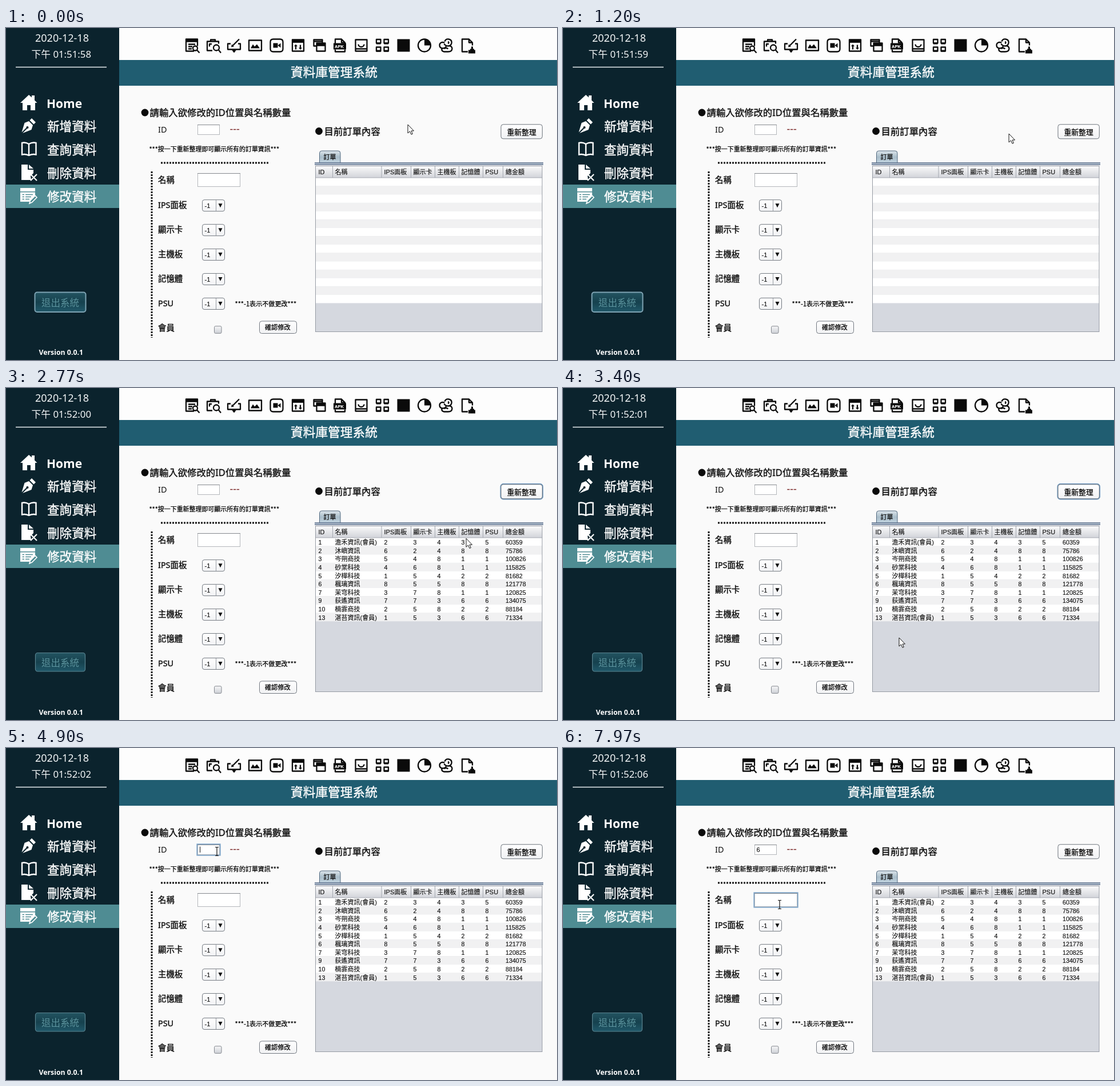
An HTML page for the animation above (8000 ms loop, 964 px wide and 581 px high).

```html
<!DOCTYPE html>
<html lang="zh-Hant">
<head>
<meta charset="utf-8">
<title>資料庫管理系統</title>
<style>
  html, body { margin: 0; width: 100%; height: 100%; overflow: hidden; background: #fafafa; }
  svg { display: block; width: 964px; height: 581px; }
  text { white-space: pre; font-family: "Noto Sans", "Noto Sans CJK TC", "Noto Sans CJK", sans-serif; }
  .cjk { font-family: "Noto Sans CJK TC", "Noto Sans CJK", sans-serif; stroke-width: .25px; }
  .ui { font-family: "Liberation Sans", "Noto Sans CJK TC", "Noto Sans CJK", sans-serif; stroke-width: .15px; }
  .mid { stroke-width: .4px; }
  .bold { font-weight: 700; }
</style>
</head>
<body>
<svg id="stage" viewBox="0 0 964 581" xmlns="http://www.w3.org/2000/svg">
  <defs>
    <linearGradient id="button" x2="0" y2="1"><stop stop-color="#fff"/><stop offset=".5" stop-color="#f8f8f9"/><stop offset="1" stop-color="#f1f2f4"/></linearGradient>
    <linearGradient id="pressed" x2="0" y2="1"><stop stop-color="#aeb8c4"/><stop offset="1" stop-color="#d3dae2"/></linearGradient>
    <linearGradient id="head" x2="0" y2="1"><stop stop-color="#fbfbfc"/><stop offset=".5" stop-color="#e6e7ea"/><stop offset="1" stop-color="#d2d4da"/></linearGradient>
    <linearGradient id="tab" x2="0" y2="1"><stop stop-color="#dbe4ea"/><stop offset=".5" stop-color="#a9bdca"/><stop offset="1" stop-color="#c4d6e2"/></linearGradient>
    <linearGradient id="exit" x2="0" y2="1"><stop stop-color="#235461"/><stop offset=".5" stop-color="#16414e"/><stop offset="1" stop-color="#21596a"/></linearGradient>
    <linearGradient id="check" x2="0" y2="1"><stop stop-color="#f7f7f8"/><stop offset="1" stop-color="#cdd0d6"/></linearGradient>
  </defs>
</svg>
<script>
const LOOP = 8000;
const stage = document.getElementById('stage');

function add(tag, attrs, parent = stage) {
  const node = document.createElementNS(stage.namespaceURI, tag);
  for (const key in attrs) node.setAttribute(key, attrs[key]);
  return parent.appendChild(node);
}
const group = (attrs = {}, parent) => add('g', attrs, parent);
const rect = (x, y, width, height, fill, more, parent) =>
  add('rect', { x, y, width, height, fill, ...more }, parent);
const path = (d, attrs, parent) => add('path', { d, fill: 'none', ...attrs }, parent);
function text(x, y, size, content, fill = '#111', cls = 'plain', parent) {
  const stroke = /mid|cjk|ui/.test(cls) ? fill : 'none';
  const node = add('text', { x, y, 'font-size': size, fill, stroke, class: cls }, parent);
  node.textContent = content;
  return node;
}
const show = (node, on) => node.setAttribute('visibility', on ? 'visible' : 'hidden');

// Page areas
rect(198, 0, 766, 56, '#fdfdfd');
rect(198, 56, 766, 45, '#205d71');
rect(0, 0, 198, 581, '#0b232d');
rect(0, 274, 198, 41, '#4f8c93');
text(498, 84.7, 21.7, '資料庫管理系統', '#fff', 'mid');

// Sidebar
text(51, 23.7, 18, '2020-12-18', '#f4f7f8');
const clock = text(44.5, 52, 16.8, '', '#f4f7f8');
path('M17 68.5H176', { stroke: '#e9eef0', 'stroke-width': 1.6 });
text(71, 139.6, 21, 'Home', '#fff', 'bold');
['新增資料', '查詢資料', '刪除資料', '修改資料'].forEach((label, i) =>
  text(72, 180 + i * 41, 21.6, label, '#fff', 'mid'));
text(57.5, 572, 12.3, 'Version 0.0.1', '#fff', 'bold');

const solid = { fill: '#fff' };
path('M25 131L40 117L45 121.500V118H50V126.500L54.500 131H51V144H43V135H37V144H29V131Z', solid);
path('M45 158L52 165L48.500 168.500L41.500 161.500ZM40 163L47 170L44.500 178L29 184L37 176A2 2 0 1 0 35.500 174.500L27.500 182.500L32.500 166Z', solid);
path('M40 203Q34 199.500 28 201V221.500Q34 220 40 223Q46 220 52.500 221.500V201Q46 199.500 40 203V222', { stroke: '#fff', 'stroke-width': 2.4 });
path('M27 239H38V248H48V254L43 259L44 266H27ZM40 239L48 246H40Z', solid);
path('M43 256L54 267M54 256L43 267', { stroke: '#fff', 'stroke-width': 2.2 });
path('M25 280H51V286H25ZM25 287.500H51V293L41 303V304H25Z', solid);
path('M28.500 291.500H32M34 291.500H47M28.500 295.500H32M34 295.500H44M28.500 299.500H32M34 299.500H41', { stroke: '#4f8c93', 'stroke-width': 1.6 });
path('M41 307L42.500 302L51 293.500L54 296.500L45.500 305Z', { stroke: '#fff', 'stroke-width': 1.6 });

const exitButton = rect(0, 0, 0, 0, 'url(#exit)', { rx: 4 });
text(62, 486.6, 16.5, '退出系統', '#5a929c');

// Toolbar: centre x, outlined shape, filled shape
const icons = [
  [326, 'M3 10H-11V-11H9V1M-11-7H9M-7-2H5M-7 2H0M-7 6H-1M1 5a4 4 0 1 0 8 0a4 4 0 1 0-8 0M8 8L12.500 13', 'M-11-11H9V-7H-11Z'],
  [363, 'M-2 9H-11V-7H9V-3M-5-7V-10H3V-7M-7 2V-2.500H-3M0 4a5 5 0 1 0 10 0a5 5 0 1 0-10 0M9 8L13 13'],
  [399, 'M-6-3H-11V7H11V-3H7M0 7V11M9-11L-2 0', 'M-4 8H4L0 13ZM-5 3L-4-2L0 2Z'],
  [436, 'M-11-9H11V9H-11Z', 'M-8 5L-4-2L-1 2L3-2L8 5Z'],
  [473.5, 'M-6-11H6Q11-11 11-6V6Q11 11 6 11H-6Q-11 11-11 6V-6Q-11-11-6-11Z', 'M-6-4H2V4H-6ZM2 0L7-4V4Z'],
  [511, 'M-10-10H10V10H-10ZM-10-6H10M-4 7V0M4-1V6', 'M-10-10H10V-5H-10ZM-7 1.500L-4-2L-1 1.500ZM1 4L4 7.500L7 4Z'],
  [548.5, 'M-6 1H-10V-10H5V-5M-10-7H5M-5-4H10V10H-5ZM-5 0H10', 'M-5-4H10V0H-5Z'],
  [584, 'M-8-2V-11H3L9-5V-2M-8 7V11H9V7M3-11V-5H9', 'M-11-4H11V7H-11Z'],
  [621.5, 'M-10-10H10V10H-10ZM-10 6H10M-5-2a5 4.500 0 0 0 10 0'],
  [658.5, 'M-10.500-10.500H-3V-4H-10.500ZM3-10.500H10.500V-4H3ZM-10.500 3H-3V10H-10.500ZM3 3H10.500V10H3Z', 'M-10.500-5H-3V-2H-10.500ZM3-5H10.500V-2H3ZM-10.500 8H-3V11H-10.500ZM3 8H10.500V11H3Z'],
  [695.5, '', 'M-11-11H11V11H-11Z'],
  [732, 'M-11 0a11 11 0 1 0 22 0a11 11 0 1 0-22 0', 'M0 0V-11A11 11 0 0 1 11 0Z'],
  [769.5, 'M-2-7Q0-12 5-11Q11-10 10-4Q9 1 4 1Q-1 1-3-3M-2-5Q-10-7-11-1Q-11 5-5 5Q0 5 1 0M-7 5Q-8 10-3 11H4Q11 11 11 5Q10 0 4 1M-3 6Q0 3 4 6M4-7Q6-5 4-3'],
  [808, 'M0 11H-10V-11H2L8-5V0M2-11V-5H8', 'M1 14V8H4V6H6V2H9V6H11V8H13V14Z'],
];
for (const [x, outline, filled] of icons) {
  const icon = group({ transform: `translate(${x} 30.500)` });
  path(outline, { stroke: '#0b0b0b', 'stroke-width': 2.3, 'stroke-linejoin': 'round' }, icon);
  if (filled) path(filled, { fill: '#0b0b0b' }, icon);
}
text(575, 35, 7.5, 'APK', '#fff', 'ui bold');

// Form
const bullet = (cx, cy) => add('circle', { cx, cy, r: 6.4, fill: '#0b0b0b' });
bullet(243, 148);
text(251.5, 154.1, 16.4, '請輸入欲修改的ID位置與名稱數量', '#111', 'mid');
text(266, 183, 14.4, 'ID');
text(391.5, 183, 18, '---', '#7b2626');
text(250.5, 216.1, 10.95, '***按一下重新整理即可顯示所有的訂單資訊***', '#000', 'cjk');
const dots = { stroke: '#111', 'stroke-width': 3, 'stroke-dasharray': '3 2' };
path('M271 236H459', dots);
path('M255 251V542', dots);
const rowLabels = [['名稱', 270.5], ['IPS面板', 315.3], ['顯示卡', 358.4], ['主機板', 401.4],
  ['記憶體', 444.4], ['PSU', 487.2], ['會員', 529.8]];
rowLabels.forEach(([label, y]) => text(266, y, 14.4, label, '#111', 'mid'));

function field(x, y, w, h) {
  const ring = rect(x - .5, y - .5, w + 1, h + 1, '#fff', { stroke: '#7ba3c8', 'stroke-width': 2.2 });
  rect(x + .5, y + .5, w - 1, h - 1, '#fff', { stroke: '#b4b7bb' });
  path(`M${x} ${y + .5}H${x + w}`, { stroke: '#85898e' });
  return ring;
}
const idRing = field(335, 169, 39, 18);
const nameRing = field(335, 254, 75, 24);
const idValue = text(338.5, 182, 11, '6', '#111', 'ui');
const idCaret = path('', { stroke: '#111' });
const nameCaret = path('M339.500 260V273', { stroke: '#111' });

for (let i = 0; i < 5; i++) {
  const y = 300.7 + i * 42.95;
  rect(343.5, y, 39, 20, 'url(#button)', { rx: 3.5, stroke: '#737981' });
  path(`M367.500 ${y + .5}V${y + 19.5}`, { stroke: '#979ca3' });
  path(`M371.500 ${y + 6.5}h7l-3.500 7z`, { fill: '#111' });
  text(347.5, y + 14.2, 11, '-1', '#111', 'ui');
}
text(400.5, 486.6, 11.1, '***-1表示不做更改***', '#000', 'cjk');
rect(364.5, 521.8, 12.5, 12.5, 'url(#check)', { rx: 2, stroke: '#83878e' });
rect(443.5, 513, 65, 21.5, 'url(#button)', { rx: 4, stroke: '#737981' });
text(453, 528.2, 11.2, '確認修改', '#000', 'cjk');

// Order panel
bullet(547.5, 180.5);
text(556.5, 186.7, 16.4, '目前訂單內容', '#111', 'mid');
const refreshRing = rect(865, 167.5, 74.5, 27.5, '#6b96bf', { rx: 5, stroke: '#6b96bf' });
const refresh = rect(866, 168.8, 72.3, 25, 'url(#button)', { rx: 4, stroke: '#6c737b' });
text(876.5, 186.6, 12.8, '重新整理', '#000', 'cjk');

path('M548.500 237V219Q548.500 215 552.500 215H581Q585 215 585 219V237Z', { fill: 'url(#tab)', stroke: '#526a80' });
text(555.5, 229.6, 11, '訂單', '#111', 'cjk');
rect(540, 235.5, 400, 4, '#c5d2de');
path('M540 236H940M540 239H940', { stroke: '#263d63', 'stroke-width': 1.2 });

const ROW = 14.63, TOP = 262;
rect(541.5, 241.5, 396.5, 290, '#d5d8df');
const stripes = count => {
  const g = group();
  for (let i = 0; i < count; i++) rect(542, TOP + i * ROW, 396, ROW, i % 2 ? '#f1f1f2' : '#fff', {}, g);
  return g;
};
const emptyRows = stripes(15);
const filledRows = stripes(10);
rect(542, 241.5, 396, 20.5, 'url(#head)');
path('M542 262H938', { stroke: '#a7abb3' });
[571.5, 657, 708.5, 750.5, 792.5, 834.5, 869.5].forEach(x => path(`M${x} 242V262`, { stroke: '#a5a9b1' }));
const columns = [546.5, 575.5, 661.5, 712.5, 754.5, 796.5, 838.5, 874];
['ID', '名稱', 'IPS面板', '顯示卡', '主機板', '記憶體', 'PSU', '總金額'].forEach((label, i) =>
  text(columns[i], 256, 11, label, '#111', 'ui'));
const orders = `1 澹禾資訊(會員) 2 3 4 3 5 60359
2 沐嶼資訊 6 2 4 8 8 75786
3 岑朔商技 5 4 8 1 1 100826
4 砂棠科技 4 6 8 1 1 115825
5 汐樺科技 1 5 4 2 2 81682
6 楓璃資訊 8 5 5 8 8 121778
7 茉穹科技 3 7 8 1 1 120825
9 荻遙資訊 7 7 3 6 6 134075
10 楠霏商技 2 5 8 2 2 88184
13 湛苔資訊(會員) 1 5 3 6 6 71334`.split('\n');
orders.forEach((line, row) => line.split(' ').forEach((cell, i) =>
  text(columns[i], 274 + row * ROW, i === 1 ? 11 : 10.7, cell, '#111', 'ui', filledRows)));
rect(541.5, 241.5, 396.5, 290, 'none', { stroke: '#969ba4' });

// Pointer
const arrow = path('M0 0V15L3.500 11.800L6 17.300L8.300 16.300L6 11H10.500Z', { fill: '#fff', stroke: '#111', 'stroke-linejoin': 'round' });
const beam = path('M-3-7.500H-1Q0-7.500 0-6.500Q0-7.500 1-7.500H3M0-7V7M-3 7.500H-1Q0 7.500 0 6.500Q0 7.500 1 7.500H3', { stroke: '#111', 'stroke-width': 1.2 });

// time, x, y
const route = [
  [0, 703, 169], [350, 705, 170], [1200, 780, 185], [1650, 857, 188], [2050, 899, 180], [2560, 899, 180],
  [3100, 645, 405], [3400, 588, 437], [3700, 582, 438], [4500, 369, 181], [6800, 369, 181],
  [7150, 379, 274], [LOOP, 379, 274],
];
function pointerAt(t) {
  const i = route.findIndex(stop => stop[0] > t);
  const [t0, x0, y0] = route[i - 1], [t1, x1, y1] = route[i];
  const k = (t - t0) / (t1 - t0), ease = k * k * (3 - 2 * k) * .4 + k * .6;
  return [x0 + (x1 - x0) * ease, y0 + (y1 - y0) * ease];
}

const PRESS = 2350, LOADED = 2500, ID_FOCUS = 4750, TYPED = 5700, NAME_FOCUS = 7300;
const blink = (t, since) => t >= since && (t - since) % 1000 < 500;
const inside = (x, y, l, t, r, b) => x > l && x < r && y > t && y < b;

function draw(t) {
  const second = 58 + Math.floor((t + 65) / 1000);
  clock.textContent = `下午 01:${second < 60 ? 51 : 52}:${String(second % 60).padStart(2, '0')}`;

  const box = t < PRESS
    ? { x: 50.5, y: 462.5, width: 89, height: 34.5, stroke: '#7fa4b4', 'stroke-width': 2 }
    : { x: 51.5, y: 463.5, width: 87, height: 32.5, stroke: '#5b8592', 'stroke-width': 1.2 };
  for (const key in box) exitButton.setAttribute(key, box[key]);

  refresh.setAttribute('fill', t >= PRESS && t < LOADED ? 'url(#pressed)' : 'url(#button)');
  show(refreshRing, t >= PRESS && t < ID_FOCUS);
  show(emptyRows, t < LOADED);
  show(filledRows, t >= LOADED);

  const typed = t >= TYPED, onId = t >= ID_FOCUS && t < NAME_FOCUS;
  show(idRing, onId);
  show(nameRing, t >= NAME_FOCUS);
  show(idValue, typed);
  idCaret.setAttribute('d', `M${typed ? 345.5 : 339.5} 172.500V183`);
  show(idCaret, onId && blink(t, typed ? TYPED : ID_FOCUS));
  show(nameCaret, blink(t, NAME_FOCUS));

  const [x, y] = pointerAt(t);
  const overField = inside(x, y, 335, 169, 374, 187) || inside(x, y, 335, 254, 411, 278);
  for (const shape of [arrow, beam]) shape.setAttribute('transform', `translate(${x} ${y})`);
  show(arrow, !overField);
  show(beam, overField);
}

function tick() {
  draw(performance.now() % LOOP);
  requestAnimationFrame(tick);
}
tick();
</script>
</body>
</html>
```
